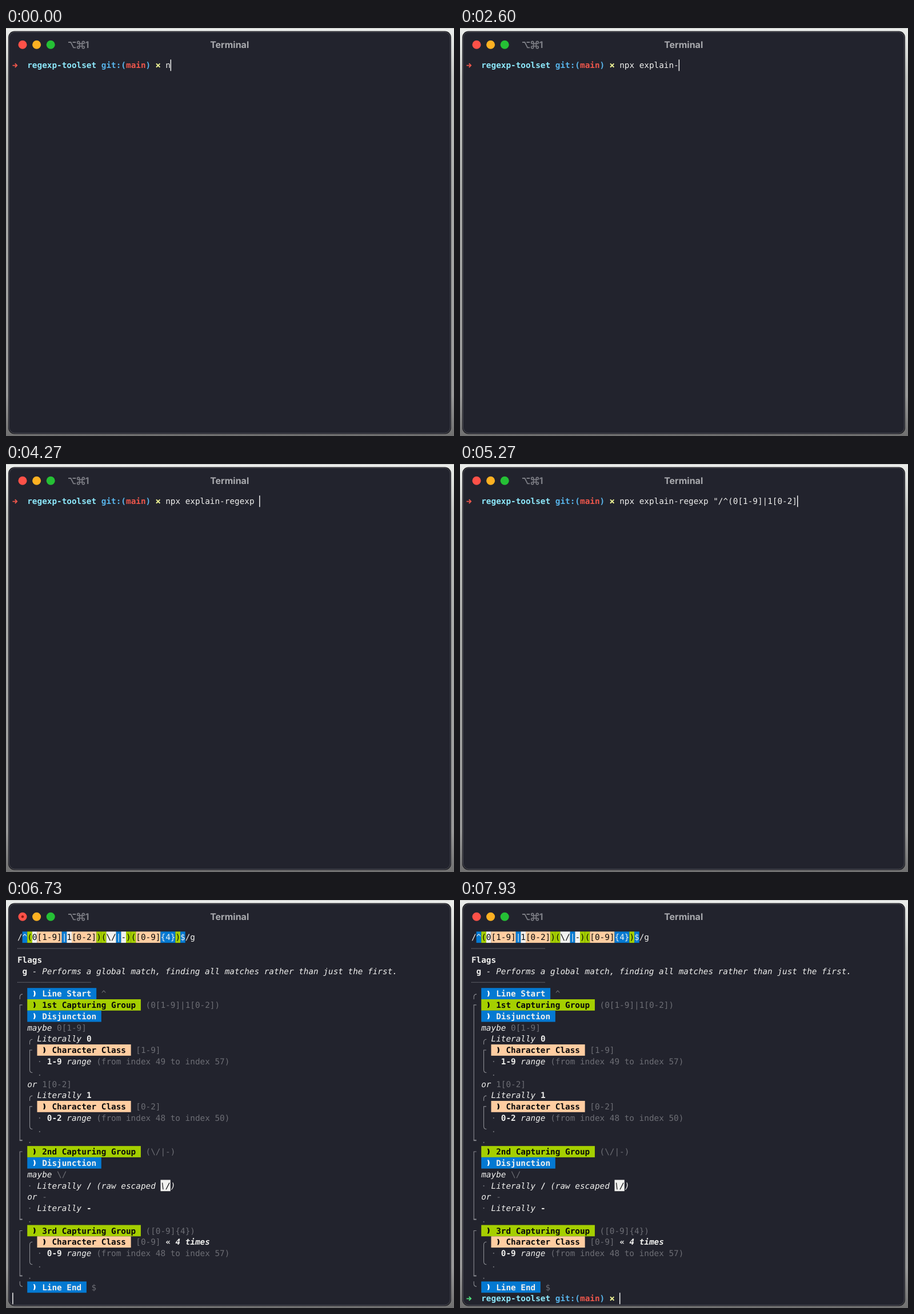
Write an HTML page that moves like this. It is 784 px wide and 715 px high and loops after 8000 ms.

```html
<!DOCTYPE html>
<html lang="en">
<head>
<meta charset="utf-8">
<title>Terminal</title>
<style>
  html, body { margin: 0; width: 100%; height: 100%; overflow: hidden; }
  svg { display: block; width: 784px; height: 715px; }
  text { white-space: pre; text-rendering: geometricPrecision; fill: #f0f0ee; }
  #screen text { font: 14.352px "DejaVu Sans Mono", "Noto Sans Mono", monospace; font-variant-ligatures: none; }
  #screen .b { font-weight: 700; }
  #screen .i { font-style: italic; }
  .dim { fill: #6d6e75; }
  .ink { fill: #08080a; }
  .cyan { fill: #8de8fb; }
  .blue { fill: #58b4ea; }
  .red { fill: #ee564b; }
  .title { font: 700 16px Inter, sans-serif; fill: #a9aaae; }
  .rail { fill: none; stroke: #8b8c92; stroke-width: 1.1; }
</style>
</head>
<body>
<svg viewBox="0 0 784 715">
  <defs>
    <linearGradient id="desk" x2="0" y2="1">
      <stop offset="0" stop-color="#eceeec"/>
      <stop offset=".12" stop-color="#c2c4c1"/>
      <stop offset=".4" stop-color="#a8a9a7"/>
      <stop offset=".9" stop-color="#989898"/>
      <stop offset="1" stop-color="#707070"/>
    </linearGradient>
  </defs>
  <rect width="784" height="715" fill="url(#desk)"/>
  <rect width="784" height="1" fill="#c9cac9"/>
  <rect x="4" y="5.5" width="775" height="706" rx="11" fill="#17171c"/>
  <rect x="5.5" y="7" width="772" height="703" rx="10" fill="#22232d" stroke="#50515a"/>
  <circle cx="29" cy="29.2" r="7.5" fill="#fe5148"/>
  <circle cx="53.6" cy="29.2" r="7.5" fill="#fdb122"/>
  <circle cx="78.2" cy="29.2" r="7.5" fill="#25c035"/>
  <circle id="busy" cx="29" cy="29.2" r="2.2" fill="#8c1a10"/>
  <g fill="none" stroke="#7d7e85" stroke-width="1.8">
    <path d="M109 25h4.4l4.8 9.4h4M116.6 25h5.6"/>
    <path d="M128.7 27.4h4.6v4.4h-4.6zM128.7 27.4h-2a2 2 0 1 1 2-2zM133.3 27.4v-2a2 2 0 1 1 2 2zM133.3 31.8h2a2 2 0 1 1-2 2zM128.7 31.8v2a2 2 0 1 1-2-2z" stroke-width="1.6"/>
  </g>
  <text class="title" x="138.5" y="35" style="fill:#7d7e85">1</text>
  <text class="title" x="391.2" y="35" text-anchor="middle">Terminal</text>
  <g id="screen">
    <g id="command"></g>
    <g id="output"></g>
    <g id="nextPrompt"></g>
    <rect id="cursor" width="1.5" height="20" fill="#f2f2f2"/>
  </g>
</svg>
<script>
const LOOP = 8000, CELL = 8.64, LINE = 19.78, TICK = 200 / 3;
const BLUE = '#0479d2', GREEN = '#a5cf00', PEACH = '#ffcda1', WHITE = '#f1f1ef';
const $ = id => document.getElementById(id);
const colX = col => 11.3 + col * CELL;
const rowY = row => 55.3 + row * LINE;
const midY = row => rowY(row) + LINE / 2;

function add(parent, tag, attrs) {
  const node = document.createElementNS('http://www.w3.org/2000/svg', tag);
  for (const key in attrs) node.setAttribute(key, attrs[key]);
  return parent.appendChild(node);
}

function put(parent, row, col, text, cls = '', bg) {
  if (bg) add(parent, 'rect', { x: colX(col), y: rowY(row), width: text.length * CELL, height: LINE, fill: bg });
  const node = add(parent, 'text', { x: colX(col), y: rowY(row) + 15.1, class: cls });
  node.textContent = text;
  return node;
}

function prompt(parent, row, arrowColor) {
  const y = midY(row) + .4, x = colX(29) + CELL / 2;
  add(parent, 'path', { d: `M11.5 ${y}h7.5m-3.2-3.4l3.4 3.4l-3.4 3.4`, fill: 'none', stroke: arrowColor, 'stroke-width': 1.8 });
  put(parent, row, 3, 'regexp-toolset', 'b cyan');
  put(parent, row, 18, 'git:(', 'b blue');
  put(parent, row, 23, 'main', 'b red');
  put(parent, row, 27, ')', 'b blue');
  add(parent, 'path', { d: `M${x - 3.2} ${y - 3.2}l6.4 6.4m0-6.4l-6.4 6.4`, stroke: '#eef394', 'stroke-width': 2 });
}

const out = $('output');
const say = (row, col, text, cls, bg) => put(out, row, col, text, cls, bg);

function label(row, col, text, bg, note) {
  const ink = bg === BLUE ? 'b' : 'b ink';
  say(row, col, `   ${text} `, ink, bg);
  const x = colX(col + 1) + 2, y = midY(row);
  add(out, 'path', {
    d: `M${x} ${y - 5.2}h2.2q3.4 5.2 0 10.4h-2.2q2.6-5.2 0-10.4z`,
    fill: bg === BLUE ? '#fff' : '#08080a'
  });
  say(row, col + text.length + 5, note, 'dim');
}

function dots(row) {
  add(out, 'path', { d: `M${colX(1)} ${midY(row)}H${colX(16)}`, class: 'rail', 'stroke-dasharray': '1.2 .96' });
}

function rail(col, top, bottom, roundTop, roundBottom) {
  const x = colX(col) + CELL / 2, y0 = midY(top), y1 = midY(bottom);
  const head = roundTop ? `M${x + 4.8} ${y0}q-4.8 0-4.8 5` : `M${x + 4.4} ${y0}H${x}`;
  const foot = roundBottom ? `V${y1 - 5}q0 5 4.8 5` : `V${y1}`;
  add(out, 'path', { d: head + foot, class: 'rail' });
  if (!roundBottom) add(out, 'path', { d: `M${x - .5} ${y1}h4.9`, class: 'rail', style: 'stroke-width:2' });
  say(bottom, col + 2, '.', 'dim');
}

function hook(col, row, down = true) {
  const x = colX(col) + CELL / 2, s = down ? 1 : -1;
  add(out, 'path', { d: `M${x + 4.8} ${midY(row) + s}q-4.8 0-4.8 ${5 * s}v${4 * s}`, class: 'rail' });
}

function literally(row, text) {
  say(row, 5, 'Literally', 'i');
  say(row, 15, text, 'b');
}

function range(row, span, from, to) {
  say(row, 5, '·', 'dim');
  say(row, 7, span, 'b');
  say(row, 11, 'range', 'i');
  say(row, 17, `(from index ${from} to index ${to})`, 'dim');
}

function branch(row, word, pattern) {
  say(row, 3, word, 'i');
  say(row, 4 + word.length, pattern, 'dim');
}

function buildOutput() {
  let col = 1;
  const pattern = [
    ['/'], ['^', BLUE], ['(', GREEN], ['0', WHITE], ['[1-9]', PEACH], ['|', BLUE], ['1', WHITE],
    ['[0-2]', PEACH], [')', GREEN], ['(', GREEN], ['\\/', WHITE], ['|', BLUE], ['-', WHITE], [')', GREEN],
    ['(', GREEN], ['[0-9]', PEACH], ['{4}', BLUE], [')', GREEN], ['$', BLUE], ['/g']
  ];
  for (const [text, bg] of pattern) {
    say(0, col, text, bg && bg !== BLUE ? 'ink' : '', bg);
    col += text.length;
  }
  dots(1);
  say(2, 1, 'Flags', 'b');
  say(3, 2, 'g', 'b');
  say(3, 4, '- Performs a global match, finding all matches rather than just the first.', 'i');
  dots(4);

  hook(1, 5);
  label(5, 3, 'Line Start', BLUE, '^');

  rail(1, 6, 18);
  label(6, 3, '1st Capturing Group', GREEN, '(0[1-9]|1[0-2])');
  label(7, 3, 'Disjunction', BLUE, '');
  [['maybe', '0', '1-9', 49, 57], ['or', '1', '0-2', 48, 50]].forEach(([word, digit, span, from, to], i) => {
    const row = 8 + 5 * i;
    branch(row, word, `${digit}[${span}]`);
    hook(3, row + 1);
    literally(row + 1, digit);
    rail(3, row + 2, row + 4, false, true);
    label(row + 2, 5, 'Character Class', PEACH, `[${span}]`);
    range(row + 3, span, from, to);
  });

  rail(1, 19, 25);
  label(19, 3, '2nd Capturing Group', GREEN, '(\\/|-)');
  label(20, 3, 'Disjunction', BLUE, '');
  branch(21, 'maybe', '\\/');
  say(22, 3, '·', 'dim');
  literally(22, '/');
  say(22, 17, '(raw escaped', 'i');
  say(22, 30, '\\/', 'ink i', WHITE);
  say(22, 32, ')', 'i');
  branch(23, 'or', '-');
  say(24, 3, '·', 'dim');
  literally(24, '-');

  rail(1, 26, 30);
  label(26, 3, '3rd Capturing Group', GREEN, '([0-9]{4})');
  rail(3, 27, 29, true, true);
  label(27, 5, 'Character Class', PEACH, '[0-9]');
  say(27, 31, '«', 'b');
  say(27, 33, '4 times', 'b i');
  range(28, '0-9', 48, 57);

  hook(1, 31, false);
  label(31, 3, 'Line End', BLUE, '$');
}

const COMMAND = 'npx explain-regexp "/^(0[1-9]|1[0-2])(\\/|-)([0-9]{4})$/g"';
const KEYS = [0, 70, 270, 670, 1000, 1270, 1470, 1670, 1870, 2070, 2330, 2600,
  2800, 3000, 3200, 3400, 3530, 3800, 4070, 4530, 4730];
const BURST = 5000, ENTER = 5800, FEED = 6400, RESULT = 6730, DONE = 7000;

function typedCount(t) {
  if (t < BURST) return KEYS.filter(at => at <= t).length;
  const fast = 3 * (Math.floor((t - BURST) / TICK) + 1);
  return Math.min(COMMAND.length, KEYS.length + fast);
}

function cursorCell(t, typed) {
  if (t >= DONE) return [32, 31];
  if (t >= RESULT) return [32, 0];
  if (t >= FEED) return [2, 0];
  if (t >= ENTER) return [1, 0];
  return [0, 31 + typed];
}

prompt($('command'), 0, '#ee564b');
prompt($('nextPrompt'), 32, '#4fe07c');
const typedText = put($('command'), 0, 31, '');
buildOutput();

const show = (id, on) => $(id).setAttribute('visibility', on ? 'visible' : 'hidden');

function render(t) {
  const typed = typedCount(t), [row, col] = cursorCell(t, typed);
  typedText.textContent = COMMAND.slice(0, typed);
  $('cursor').setAttribute('x', colX(col) - .2);
  $('cursor').setAttribute('y', rowY(row));
  show('command', t < RESULT);
  show('output', t >= RESULT);
  show('nextPrompt', t >= DONE);
  show('busy', t >= RESULT && t < DONE);
}

const start = performance.now();
function tick() {
  render((performance.now() - start) % LOOP);
  requestAnimationFrame(tick);
}
tick();
</script>
</body>
</html>
```
